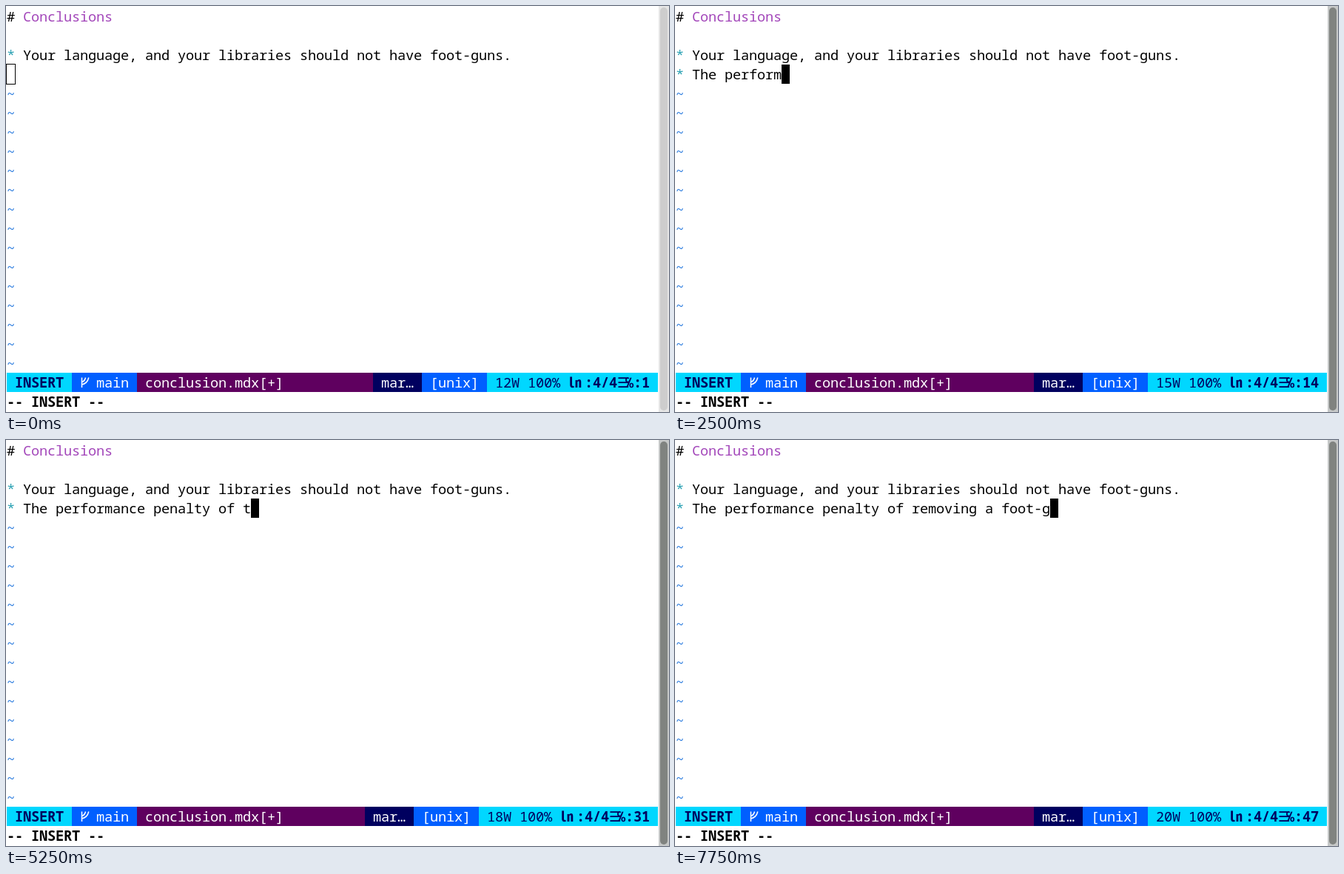
Animation of 896x548 px, one loop 8 s. Source, as an HTML page with a canvas:

```html
<!DOCTYPE html>
<html lang="en">
<head>
<meta charset="utf-8">
<title>Typing conclusions</title>
<style>
  html, body { margin: 0; width: 896px; height: 548px; overflow: hidden; background: #fff; }
  canvas { display: block; }
</style>
</head>
<body>
<canvas id="stage" width="896" height="548"></canvas>
<script>
const ctx = document.getElementById('stage').getContext('2d');
const LOOP = 8000, TICK = 250, FOCUS = 250;
const CELL = 11, LINE = 26, PAD = 1, BASE = 20, COLS = 80;
const FONT = '18.667px "Noto Sans Mono", "DejaVu Sans", "Noto Sans CJK JP", monospace';
const NAVY = '#00005f', CYAN = '#00d7ff', BLUE = '#005fff', PLUM = '#5f005f';

const SENTENCE = '* The performance penalty of removing a foot-g';
const TYPO = '* The performance penalty of t';
const TYPO_FIXED = 5500;
const EARLIER_WORDS = 12;

// [time in ms, characters typed]
const TYPED = [[500, 0], [1750, 7], [2500, 13], [3750, 20], [5250, 30],
               [5500, 30], [6250, 36], [7500, 44], [7750, 46]];

const cellX = col => PAD + col * CELL;
const cellY = row => PAD + row * LINE;

function typedText(t) {
  let count = 0;
  for (let i = 1; i < TYPED.length; i++) {
    const [t0, n0] = TYPED[i - 1], [t1, n1] = TYPED[i];
    if (t >= t0) count = n0 + (n1 - n0) * Math.min(1, (t - t0) / (t1 - t0));
  }
  return (t < TYPO_FIXED ? TYPO : SENTENCE).slice(0, Math.floor(count + 1e-6));
}

// Every character sits on the terminal grid; returns the next free column.
function write(text, col, row, color, bold) {
  ctx.font = (bold ? 'bold ' : '') + FONT;
  ctx.fillStyle = color;
  for (const ch of text) {
    ctx.fillText(ch, cellX(col), cellY(row) + BASE);
    col += ch === '㏑' ? 2 : 1;
  }
  return col;
}

function fillCells(from, to, row, color) {
  ctx.fillStyle = color;
  ctx.fillRect(cellX(from), cellY(row), (to - from) * CELL, LINE);
}

function drawBranch(x, y) {
  ctx.strokeStyle = '#fff';
  ctx.lineWidth = 1.5;
  ctx.beginPath();
  ctx.moveTo(x + 2.5, y + 6.5);
  ctx.lineTo(x + 2.5, y + 20);
  ctx.moveTo(x + 2.5, y + 12.5);
  ctx.quadraticCurveTo(x + 6.5, y + 11.5, x + 7.5, y + 6.5);
  ctx.moveTo(x + 2.5, y + 16);
  ctx.quadraticCurveTo(x + 10, y + 14.5, x + 11.8, y + 6.5);
  ctx.stroke();
}

function drawStatus(text) {
  const row = 19;
  const words = EARLIER_WORDS + text.split(' ').filter(Boolean).length;
  const position = `${text.length + 1}`;
  const info = COLS - 20 - position.length;
  const format = info - 8, type = format - 6;

  fillCells(0, 8, row, CYAN);
  fillCells(8, 16, row, BLUE);
  fillCells(16, type, row, PLUM);
  fillCells(type, format, row, NAVY);
  fillCells(format, info, row, BLUE);
  fillCells(info, COLS, row, CYAN);

  write('INSERT', 1, row, NAVY, true);
  drawBranch(cellX(9), cellY(row));
  write('main', 11, row, '#fff');
  write('conclusion.mdx[+]', 17, row, '#fff');
  write('mar…', type + 1, row, '#fff');
  write('[unix]', format + 1, row, '#fff');
  const col = write(`${words}W 100% `, info + 1, row, NAVY);
  write(`㏑:4/4☰℅:${position}`, col, row, NAVY, true);
}

function drawCursor(col, row, focused) {
  if (focused) return fillCells(col, col + 1, row, '#000');
  ctx.strokeStyle = '#000';
  ctx.lineWidth = 1;
  ctx.strokeRect(cellX(col) - 0.5, cellY(row) - 0.5, CELL + 1, LINE + 1);
}

function drawScrollbar(focused) {
  ctx.fillStyle = focused ? '#c6c8c8' : '#e6e6e6';
  ctx.fillRect(882, 0, 14, 548);
  ctx.fillStyle = focused ? '#808380' : '#cdcdcd';
  ctx.beginPath();
  ctx.roundRect(884, 2, 10, 544, 5);
  ctx.fill();
}

function draw(t) {
  const text = typedText(t), focused = t >= FOCUS;
  ctx.fillStyle = '#fff';
  ctx.fillRect(0, 0, 896, 548);

  write('#', 0, 0, '#000');
  write('Conclusions', 2, 0, '#a347ba');
  write('*', 0, 2, '#2aa1b3');
  write('Your language, and your libraries should not have foot-guns.', 2, 2, '#000');
  write(text.slice(0, 1), 0, 3, '#2aa1b3');
  write(text.slice(1), 1, 3, '#000');
  for (let row = 4; row < 19; row++) write('~', 0, row, '#2a7bde');

  drawCursor(text.length, 3, focused);
  drawStatus(text);
  write('-- INSERT --', 0, 20, '#000', true);
  drawScrollbar(focused);
}

function animate() {
  const t = performance.now() % LOOP;
  draw(Math.floor(t / TICK) * TICK);
  requestAnimationFrame(animate);
}
animate();
</script>
</body>
</html>
```
